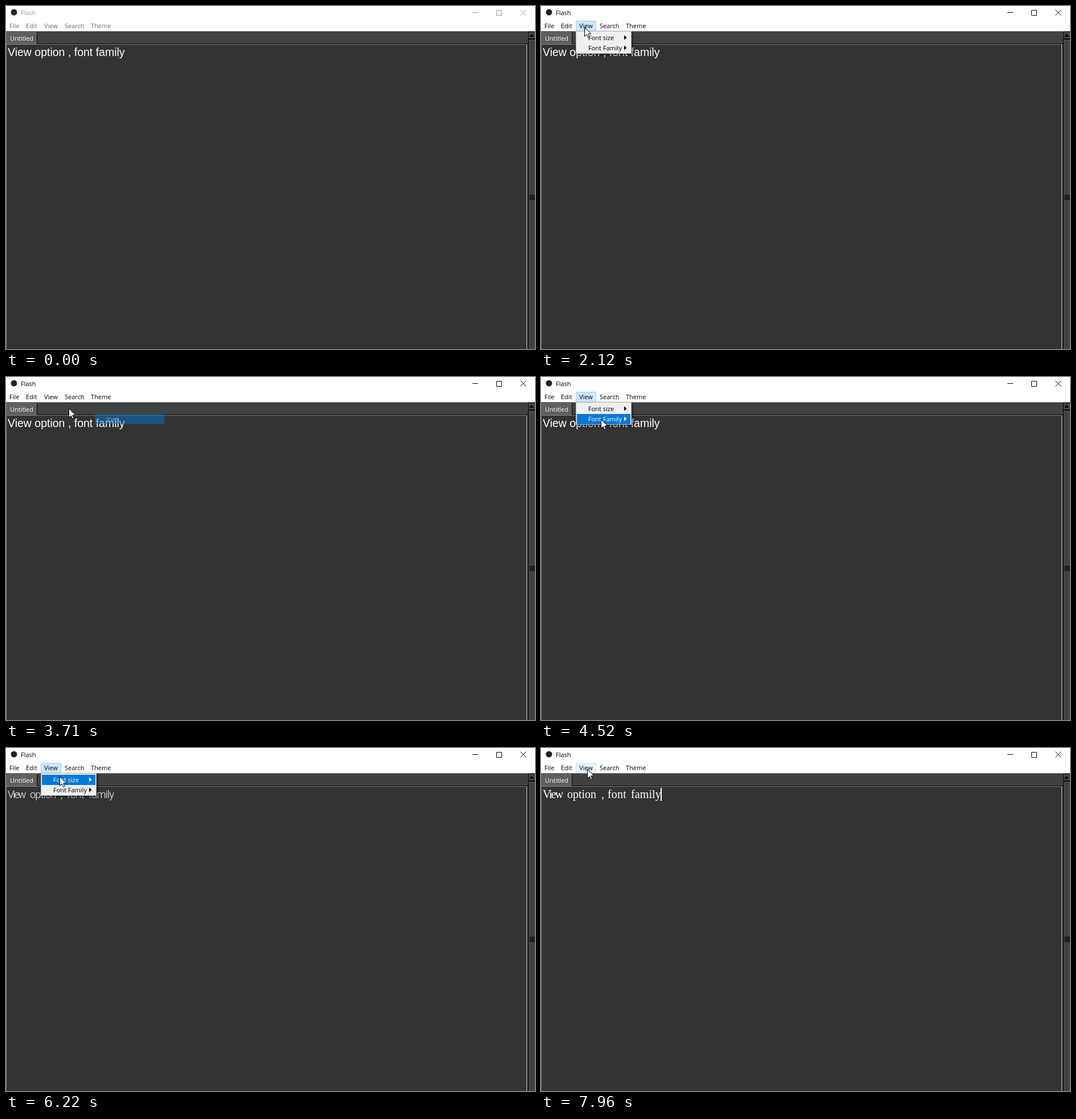
Write an HTML page with a canvas that moves like this. It is 929 px wide and 603 px high and loops after 7990 ms.

```html
<!DOCTYPE html>
<html lang="en">
<head>
<meta charset="utf-8">
<title>Text editor</title>
<style>
  html, body { margin: 0; width: 100%; height: 100%; overflow: hidden; background: #333; }
  canvas { display: block; }
</style>
</head>
<body>
<canvas id="stage" width="929" height="603"></canvas>
<script>
const ctx = document.getElementById('stage').getContext('2d');
const LOOP = 7990, ACTIVE_AT = 1200, FADE_IN = 130, FADE_OUT = 375, ROW = 17.75;
const UI = '11px "Open Sans", "Noto Sans", sans-serif';

// One visit to the View menu: menu opens, submenu opens, item `pick` is clicked.
const visits = [
  { open: 1990, sub: 2770, close: 3510, pick: 0 },
  { open: 3990, sub: 4530, close: 5200, pick: 1 },
  { open: 6020, sub: 6710, close: 7420, pick: 2 }
];
const fontNames = ['Irvel', 'Modern', 'Roman', 'Dorvick', 'Terminal', 'Calvessa Bryntelo'];

// Document faces; each word is [text, x, letter spacing].
const sans = {
  font: '19.5px "Liberation Sans", sans-serif', caret: 208,
  words: [['View option , font family', 3, 0]]
};
const faces = [sans, {
  font: '300 18.5px Roboto, "Open Sans", sans-serif', caret: 187,
  words: [['View', 3, -2.2], ['option', 42, -1], [',', 96, 0], ['font', 107, -0.7], ['family', 145, -0.9]]
}, {
  font: '20px "Liberation Serif", serif', caret: 210,
  words: [['View', 3, -2], ['option', 46, 0], [',', 106, 0], ['font', 117, 0.2], ['family', 158, 0.1]]
}];

// Pointer path: [time, x, y]
const path = [
  [320, 854, 597], [620, 560, 300], [900, 200, 72], [1110, 108, 108], [1250, 108, 108],
  [1800, 76, 37], [2120, 76, 37], [2440, 104, 78], [2960, 104, 78], [3400, 180, 72],
  [3510, 180, 72], [3840, 57, 40], [3960, 72, 37], [4020, 72, 37], [4340, 105, 74],
  [4580, 105, 74], [5020, 185, 88], [5200, 185, 88], [5470, 132, 71], [5770, 80, 37],
  [6040, 80, 37], [6470, 117, 71], [6820, 117, 71], [7210, 185, 106], [7420, 185, 106],
  [7940, 81, 37], [7990, 81, 37]
];

const clamp = v => Math.max(0, Math.min(1, v));

function slope(i, k) {
  const a = path[i - 1], p = path[i], b = path[i + 1];
  if (!a || !b || a[k] === p[k] || b[k] === p[k]) return 0;
  return (b[k] - a[k]) / (b[0] - a[0]);
}

// Cubic Hermite curve through the path points.
function pointer(t) {
  let i = 0;
  while (i < path.length - 2 && t >= path[i + 1][0]) i++;
  const p = path[i], q = path[i + 1], d = q[0] - p[0], u = clamp((t - p[0]) / d);
  const s = u * u * (3 - 2 * u);
  const at = k => p[k] + (q[k] - p[k]) * s
    + d * u * (1 - u) * (slope(i, k) * (1 - u) - slope(i + 1, k) * u);
  return { x: Math.round(at(1)), y: Math.round(at(2)) };
}

function rect(color, x, y, w, h) {
  ctx.fillStyle = color;
  ctx.fillRect(x, y, w, h);
}

function box(fill, edge, x, y, w, h) {
  rect(edge, x, y, w, h);
  rect(fill, x + 1, y + 1, w - 2, h - 2);
}

function text(str, x, y, color, font = UI, spacing = 0) {
  ctx.font = font;
  ctx.letterSpacing = spacing + 'px';
  ctx.fillStyle = color;
  ctx.fillText(str, x, y);
}

function poly(points, fill) {
  ctx.beginPath();
  points.forEach(([x, y]) => ctx.lineTo(x, y));
  ctx.closePath();
  ctx.fillStyle = fill;
  ctx.fill();
}

function windowBars(active, viewState) {
  const ink = active ? '#000' : '#999', label = active ? '#000' : '#6d6d6d';
  rect('#fff', 0, 0, 929, 44);
  ctx.beginPath();
  ctx.arc(14, 11, 5.5, 0, 7);
  ctx.fillStyle = '#1c2530';
  ctx.fill();
  text('Flash', 26, 16, ink);

  ctx.strokeStyle = ink;
  ctx.lineWidth = 1;
  ctx.beginPath();
  ctx.moveTo(819, 11.5); ctx.lineTo(829, 11.5);
  ctx.rect(861.5, 7.5, 9, 9);
  ctx.moveTo(903.5, 6.5); ctx.lineTo(913.5, 16.5);
  ctx.moveTo(913.5, 6.5); ctx.lineTo(903.5, 16.5);
  ctx.stroke();

  if (viewState === 'open') box('#cce8ff', '#99d1ff', 61, 26, 36, 19);
  if (viewState === 'hover') box('#e5f3ff', '#cce8ff', 61, 26, 36, 19);
  [['File', 6], ['Edit', 35], ['View', 67], ['Search', 103], ['Theme', 149]]
    .forEach(([s, x]) => text(s, x, 39, label));
}

function editor(face) {
  rect('#8a8a8a', 0, 44, 929, 1);
  rect('#414141', 0, 45, 929, 558);
  box('#5f5f5f', '#6c6c6c', 0, 46, 54, 22);
  rect('#000', 54, 46, 1, 21);
  rect('#000', 55, 66, 862, 1);
  text('Untitled', 7, 61, '#fff');

  rect('#858585', 0, 67, 915, 536);
  rect('#333', 1, 68, 913, 535);
  rect('#c4c4c4', 914, 68, 1, 535);
  rect('#333', 915, 67, 2, 536);

  rect('#000', 917, 45, 12, 558);
  box('#414141', '#555', 918, 46, 11, 11);
  poly([[919, 54], [923, 49], [927, 54]], '#000');
  box('#414141', '#555', 918, 59, 11, 546);
  for (let y = 332; y <= 340; y += 2) rect('#000', 919, y, 10, 1);

  face.words.forEach(([s, x, gap]) => text(s, x, 88, '#fff', face.font, gap));
}

function panel(x, y, w, h) {
  ctx.save();
  ctx.shadowColor = 'rgba(0,0,0,.55)';
  ctx.shadowBlur = 4;
  ctx.shadowOffsetX = ctx.shadowOffsetY = 2;
  rect('#b0b0b0', x, y, w, h);
  ctx.restore();
  rect('#f0f0f0', x + 1, y + 1, w - 2, h - 2);
}

function row(label, x, y, w, lit) {
  if (lit) rect('#0078d7', x, y, w, 18);
  text(label, x + 20, y + 13, lit ? '#fff' : '#000');
}

function mainMenu(lit) {
  panel(61, 44, 98, 40);
  ['Font size', 'Font Family'].forEach((label, i) => {
    const y = 47 + i * 18, on = lit === i;
    row(label, 63, y, 94, on);
    poly([[146, y + 4.5], [150.5, y + 8.5], [146, y + 12.5]], on ? '#fff' : '#000');
  });
}

function subMenu(lit, checked) {
  panel(154, 62, 127, 112);
  fontNames.forEach((name, i) => {
    const y = Math.round(65 + i * ROW), on = lit === i;
    row(name, 156, y, 122, on);
    if (checked === i) {
      ctx.strokeStyle = on ? '#fff' : '#000';
      ctx.lineWidth = 1.6;
      ctx.beginPath();
      ctx.moveTo(163, y + 8.5); ctx.lineTo(165.5, y + 11); ctx.lineTo(170, y + 6);
      ctx.stroke();
    }
  });
}

function arrow(x, y) {
  const shape = [[0, 0], [0, 16], [3.7, 12.6], [6.2, 18], [8.6, 17], [6.2, 11.6], [11.3, 11.3]];
  poly(shape.map(([a, b]) => [x + a + 0.5, y + b + 0.5]), '#fff');
  ctx.strokeStyle = '#000';
  ctx.lineWidth = 1;
  ctx.stroke();
}

function beam(x, y) {
  rect('#ddd', x, y - 7, 1, 15);
  [-7, 7].forEach(d => {
    rect('#ddd', x - 3, y + d, 3, 1);
    rect('#ddd', x + 1, y + d, 3, 1);
  });
}

function draw(t) {
  const { x, y } = pointer(t);
  const visit = visits.find(v => t >= v.open && t < v.close);
  const last = visits.filter(v => t >= v.close).pop();
  const active = t >= ACTIVE_AT;
  const overView = active && x >= 61 && x < 97 && y >= 26 && y < 45;
  const face = last ? faces[last.pick] : sans;

  windowBars(active, visit ? 'open' : overView ? 'hover' : '');
  editor(face);
  if (active && !visit && (!last || t - last.close > 300)) rect('#fff', face.caret, 70, 2, 23);

  // The chosen item lingers for a moment after the menus close.
  if (last && t - last.close < FADE_OUT) {
    ctx.globalAlpha = 1 - (t - last.close) / FADE_OUT;
    row(fontNames[last.pick], 156, Math.round(65 + last.pick * ROW), 122, true);
    ctx.globalAlpha = 1;
  }

  if (visit) {
    const subOpen = t >= visit.sub;
    const lit = subOpen || y >= 65 ? 1 : y >= 47 ? 0 : -1;
    ctx.globalAlpha = clamp((t - visit.open) / FADE_IN);
    mainMenu(lit);
    if (subOpen) {
      ctx.globalAlpha = clamp((t - visit.sub) / FADE_IN);
      subMenu(x >= 155 ? Math.floor((y - 65) / ROW) : -1, last ? last.pick : -1);
    }
    ctx.globalAlpha = 1;
  }

  if (t >= 320) (!visit && y > 67 && x < 914 ? beam : arrow)(x, y);
}

const start = performance.now();
function tick() {
  draw((performance.now() - start) % LOOP);
  requestAnimationFrame(tick);
}
tick();
</script>
</body>
</html>
```
